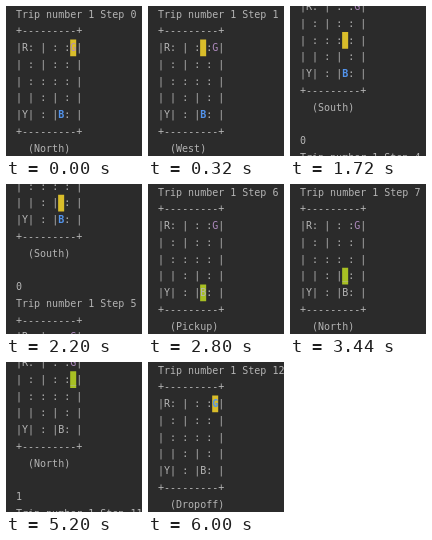
Animation, 136 px wide and 150 px high, one loop 7120 ms. Source, as an HTML page:

```html
<!DOCTYPE html>
<html lang="en">
<head>
<meta charset="utf-8">
<title>Taxi trip</title>
<style>
  html, body { margin: 0; width: 100%; height: 100%; overflow: hidden; background: #2b2b2b; }
  svg { display: block; width: 136px; height: 150px; }
  text { font: 10px "DejaVu Sans Mono", monospace; fill: #b4b4b4; white-space: pre; }
</style>
</head>
<body>
<svg viewBox="0 0 136 150"><g id="screen"></g></svg>
<script>
const LOOP = 7120, LEFT = 10, CHAR = 6.02, LINE = 16.75, BASELINE = 11.6;
const BLOCK = 11 * LINE;
const YELLOW = '#d9bd2a', GREEN = '#a8c023', BLUE = '#5394ec', MAGENTA = '#ae8abe';
const MAP = [
  '+---------+',
  '|R: | : :G|',
  '| : | : : |',
  '| : : : : |',
  '| | : | : |',
  '|Y| : |B: |',
  '+---------+'
];
const ACTIONS = {
  S: { code: 0, label: 'South', dy: 1 },
  N: { code: 1, label: 'North', dy: -1 },
  E: { code: 2, label: 'East', dx: 1 },
  W: { code: 3, label: 'West', dx: -1 },
  P: { code: 4, label: 'Pickup' },
  D: { code: 5, label: 'Dropoff' }
};
const ROUTE = 'NWSSSSPNNENND';
const PICKUP = ROUTE.indexOf('P'), DROPOFF = ROUTE.indexOf('D');

// Start of each step, and how far the output has scrolled before it settles.
const STARTS = [0, 200, 720, 1200, 1720, 2200, 2720, 3200, 3720, 4200, 4720, 5200, 5720];
const SCROLL_TIME = 40;
const scrollOf = step => step === 5 ? 73 : step % 2 || step === 4 ? 41 : 0;

const screen = document.getElementById('screen');

function add(parent, tag, attrs, content = '') {
  const node = document.createElementNS('http://www.w3.org/2000/svg', tag);
  for (const key in attrs) node.setAttribute(key, attrs[key]);
  node.textContent = content;
  return parent.appendChild(node);
}

const addText = (parent, line, content) =>
  add(parent, 'text', { x: LEFT, y: line * LINE + BASELINE }, content);

function buildBlock(step, col, row) {
  const group = add(screen, 'g', {});
  const action = ACTIONS[ROUTE[step]];
  const riding = step >= PICKUP && step < DROPOFF;
  const taxiLine = row + 2, taxiChar = 2 * col + 1;

  add(group, 'rect', {
    x: LEFT + taxiChar * CHAR, y: taxiLine * LINE,
    width: CHAR, height: LINE, fill: riding ? GREEN : YELLOW
  });
  addText(group, -1, String(action.code));
  addText(group, 0, `Trip number 1 Step ${step}`);

  MAP.forEach((chars, i) => {
    const text = addText(group, i + 1, '');
    [...chars].forEach((char, j) => {
      const onTaxi = i + 1 === taxiLine && j === taxiChar;
      const span = add(text, 'tspan', {}, onTaxi && riding && char === ' ' ? '_' : char);
      const passenger = char === 'B' && step < PICKUP || char === 'G' && step >= DROPOFF;
      if (passenger) {
        span.style.fill = BLUE;
        span.style.fontWeight = 'bold';
      } else if (char === 'G') {
        span.style.fill = MAGENTA;
      }
    });
  });
  addText(group, 8, `  (${action.label})`);
  return group;
}

let col = 4, row = 0;
const blocks = [...ROUTE].map((key, step) => {
  if (step) {
    col += ACTIONS[key].dx || 0;
    row += ACTIONS[key].dy || 0;
  }
  return buildBlock(step, col, row);
});

function place(block, y) {
  block.setAttribute('transform', `translate(0 ${y})`);
  block.setAttribute('visibility', 'visible');
}

function draw(time) {
  const step = STARTS.filter(start => start <= time).length - 1;
  const scroll = scrollOf(step);
  blocks.forEach(block => block.setAttribute('visibility', 'hidden'));
  if (step && scroll && time - STARTS[step] < SCROLL_TIME) {
    place(blocks[step - 1], -scroll);
    place(blocks[step], BLOCK - scroll);
  } else {
    place(blocks[step], 0);
  }
}

const begin = performance.now();
function tick(now) {
  draw(Math.max(0, now - begin) % LOOP);
  requestAnimationFrame(tick);
}
draw(0);
requestAnimationFrame(tick);
</script>
</body>
</html>
```
